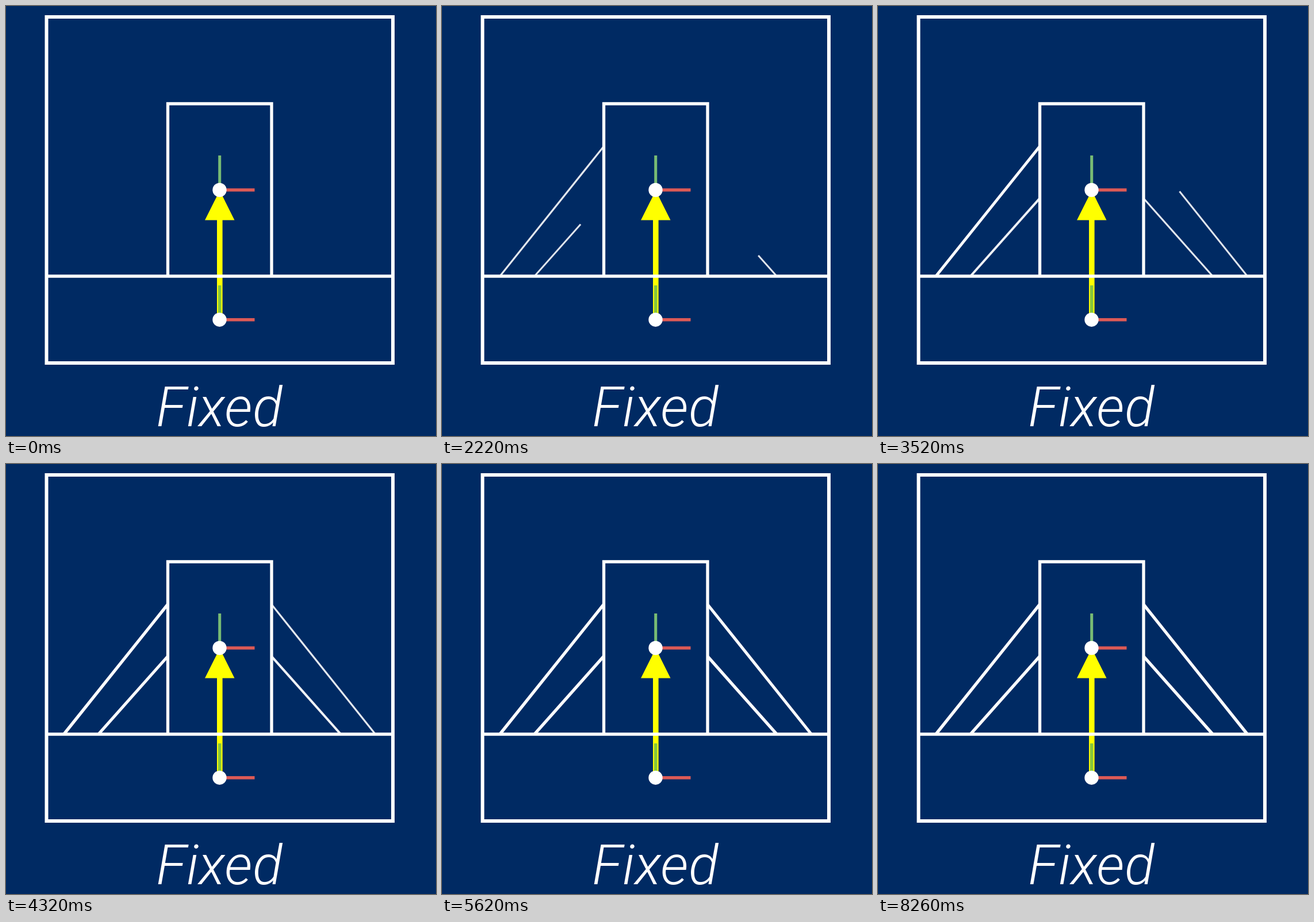
An HTML page that plays this animation: 748 by 748 pixels, repeating every 8280 ms.

```html
<!DOCTYPE html>
<html lang="en">
<head>
<meta charset="utf-8">
<title>Fixed</title>
<style>
  html, body { margin: 0; width: 100%; height: 100%; overflow: hidden; background: #002a63; }
  svg { display: block; width: 100vw; height: 100vh; }
  .white { fill: none; stroke: #fff; stroke-width: 5.3; }
  .x { stroke: #dd5a56; stroke-width: 5.5; }
  .y { stroke: #78bc74; stroke-width: 5; }
  .y.over { stroke: #88c63c; stroke-width: 5.5; }
  text { font: italic 350 96px Roboto, "Liberation Sans", sans-serif; letter-spacing: 0.5px; fill: #fff; }
</style>
</head>
<body>
<svg viewBox="0 0 748 748">
  <g id="struts" class="white"></g>
  <g fill="#ff0">
    <rect x="367" y="370" width="9.6" height="176"/>
    <path d="M371.8 321L397.5 372.6H346Z"/>
  </g>
  <g class="white">
    <rect x="70.5" y="19" width="602.5" height="602" stroke-width="6"/>
    <path d="M281.5 470V170H462V470M70.5 470H673"/>
  </g>
  <path class="x" d="M372 320H432.5M372 545.7H432.5"/>
  <path class="y" d="M371.7 320V260"/>
  <path class="y over" d="M371.7 546V486"/>
  <g fill="#fff">
    <circle cx="371.5" cy="320" r="12.2"/>
    <circle cx="371.5" cy="545.7" r="12.2"/>
  </g>
  <text x="371.2" y="730.5" text-anchor="middle">Fixed</text>
</svg>
<script>
  const LOOP = 8280, UNIT = 30.1, CX = 371.6, GROUND = 470;
  const START = 7.72, RATE = 0.02714, LAG = 0.4;   // in steps, progress per step
  const mix = (a, b, t) => a + (b - a) * t;
  const clamp = v => Math.min(1, Math.max(0, v));

  // foot x, top x and top height in grid units
  const struts = [[-9, -3, 7.5], [-7, -3, 4.5], [7, 3, 4.5], [9, 3, 7.5]].map(([foot, top, height]) => {
    const el = document.createElementNS("http://www.w3.org/2000/svg", "line");
    document.getElementById("struts").append(el);
    return { el, foot, top, height };
  });

  // Steps repeat in groups of three lasting 20, 100 and 20 ms.
  function stepAt(ms) {
    const rest = ms % 140;
    return 3 * Math.floor(ms / 140) + (rest >= 20) + (rest >= 120);
  }

  // Each strut is traced as a thin, faint line, then thickens.
  function draw(ms) {
    const progress = (stepAt(ms) - START) * RATE;
    struts.forEach(({ el, foot, top, height }, i) => {
      const p = progress - LAG * i, traced = clamp(p), filled = clamp(p - 1);
      el.setAttribute("x1", CX + UNIT * foot);
      el.setAttribute("y1", GROUND);
      el.setAttribute("x2", CX + UNIT * mix(foot, top, traced));
      el.setAttribute("y2", GROUND - UNIT * height * traced);
      el.style.strokeWidth = mix(3, 5.3, filled);
      el.style.strokeOpacity = mix(0.88, 1, filled);
      el.style.visibility = p > 0 ? "visible" : "hidden";
    });
  }

  const origin = performance.now();
  function tick() {
    draw((performance.now() - origin) % LOOP);
    requestAnimationFrame(tick);
  }
  tick();
</script>
</body>
</html>
```
